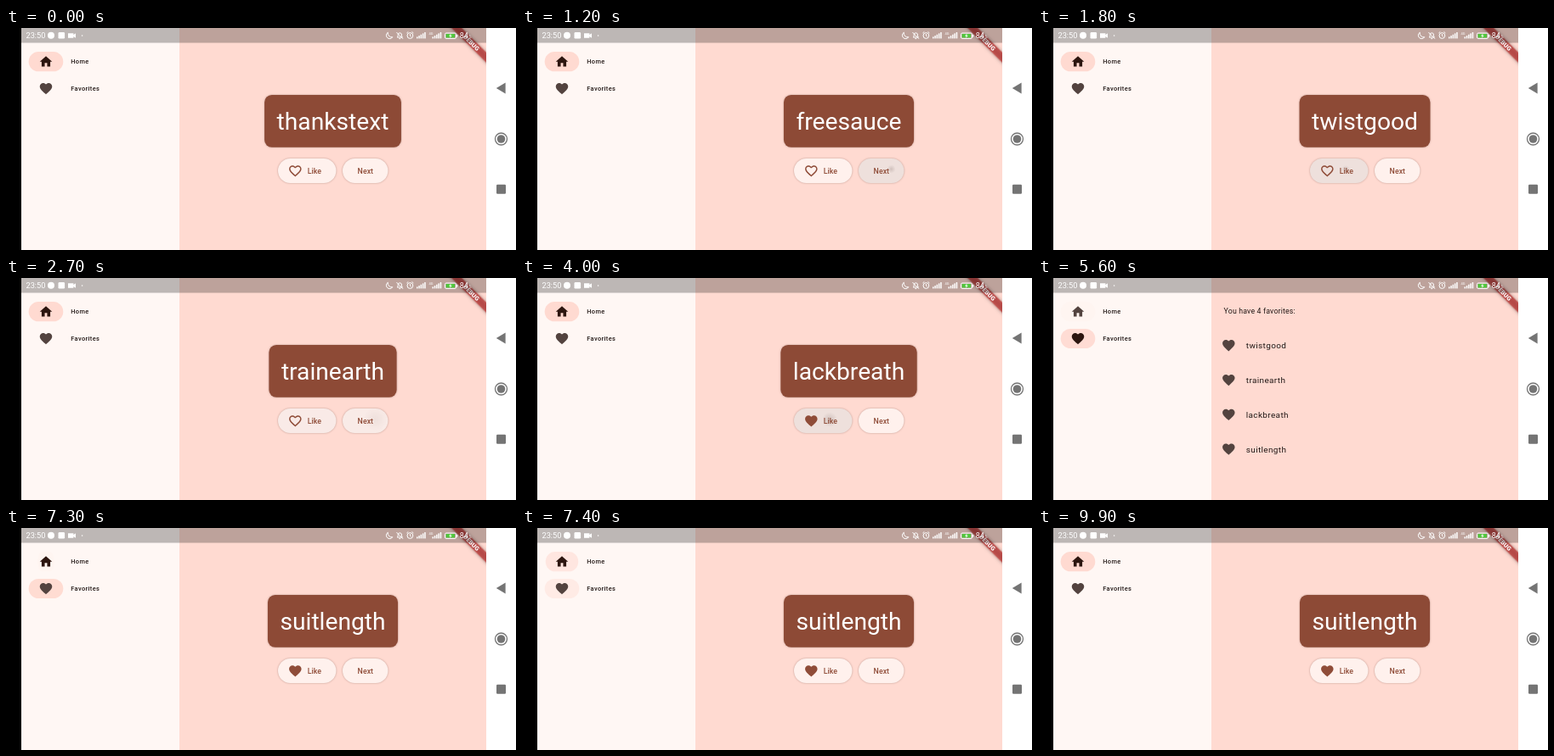
Animation, 600 px wide and 262 px high, one loop 10 s. Source, as an HTML page:

```html
<!DOCTYPE html>
<html lang="en">
<head>
<meta charset="utf-8">
<style>
html, body { margin: 0; width: 100%; height: 100%; overflow: hidden; background: #000; }
svg { display: block; width: 600px; height: 262px; font-family: Roboto, sans-serif; }
.label { font-size: 7.45px; font-weight: 500; letter-spacing: .38px; fill: #231917; }
.button { font-size: 8.75px; font-weight: 500; letter-spacing: .07px; fill: #8f4c38; }
.raised { filter: drop-shadow(0 .8px .8px rgba(60, 25, 15, .32)); }
.count { font-size: 8.73px; letter-spacing: .18px; fill: #231917; }
.item { font-size: 9.98px; letter-spacing: .36px; fill: #231917; }
</style>
</head>
<body>
<svg viewBox="0 0 600 262">
  <defs>
    <path id="heart" d="M12 21.35l-1.45-1.32C5.4 15.36 2 12.28 2 8.5 2 5.42 4.42 3 7.5 3c1.74 0 3.41.81 4.5 2.09C13.09 3.81 14.76 3 16.5 3 19.58 3 22 5.42 22 8.5c0 3.78-3.4 6.86-8.55 11.54L12 21.35z"/>
    <path id="outline" d="M16.5 3c-1.74 0-3.41.81-4.5 2.09C10.91 3.81 9.24 3 7.5 3 4.42 3 2 5.42 2 8.5c0 3.78 3.4 6.86 8.55 11.54L12 21.35l1.45-1.32C18.6 15.36 22 12.28 22 8.5 22 5.42 19.58 3 16.5 3zm-4.4 15.55l-.1.1-.1-.1C7.14 14.24 4 11.39 4 8.5 4 6.5 5.5 5 7.5 5c1.54 0 3.04.99 3.57 2.36h1.87C13.46 5.99 14.96 5 16.5 5c2 0 3.5 1.5 3.5 3.5 0 2.89-3.14 5.74-7.9 10.05z"/>
    <path id="house" d="M10 20v-6h4v6h5v-8h3L12 3 2 12h3v8z"/>
    <radialGradient id="glow">
      <stop offset="0" stop-color="#5c4a45" stop-opacity=".2"/>
      <stop offset="1" stop-color="#5c4a45" stop-opacity="0"/>
    </radialGradient>
    <clipPath id="app"><rect x="18" width="547" height="262"/></clipPath>
  </defs>

  <rect width="600" height="262"/>
  <rect x="204" width="361" height="262" fill="#ffdad1"/>
  <rect x="18" width="186" height="262" fill="#fff7f4"/>

  <g id="rail">
    <rect id="homePill" x="-20.3" y="-11.6" width="40.6" height="23.2" rx="11.6" fill="#ffdad1"/>
    <rect id="favPill" x="-20.3" y="-11.6" width="40.6" height="23.2" rx="11.6" fill="#ffdad1"/>
    <use id="homeIcon" href="#house" transform="translate(38.3 31) scale(.725)"/>
    <use id="favIcon" href="#heart" transform="translate(38.3 62.8) scale(.725)"/>
    <text class="label" x="76.2" y="42.2">Home</text>
    <text class="label" x="76.2" y="74.1">Favorites</text>
  </g>

  <g id="homePage">
    <rect id="card" class="raised" y="79" height="61.8" rx="8.7" fill="#8d4a36"/>
    <text id="word" x="384.5" y="120" font-size="28.2" text-anchor="middle" fill="#fff"></text>
    <rect class="raised" x="320" y="154" width="68.4" height="29" rx="14.5" fill="#fff1ed"/>
    <rect class="raised" x="396" y="154" width="53.4" height="29" rx="14.5" fill="#fff1ed"/>
    <g id="likeInk">
      <rect x="320" y="154" width="68.4" height="29" rx="14.5" fill="#5c4a45" fill-opacity=".1"/>
      <circle id="likeGlow" cx="362" cy="167" fill="url(#glow)"/>
    </g>
    <g id="nextInk">
      <rect x="396" y="154" width="53.4" height="29" rx="14.5" fill="#5c4a45" fill-opacity=".1"/>
      <circle id="nextGlow" cx="434.5" cy="166.5" fill="url(#glow)"/>
    </g>
    <use id="likeIcon" transform="translate(331.6 160) scale(.725)" fill="#8f4c38"/>
    <text class="button" x="354.7" y="171.8">Like</text>
    <text class="button" x="413.6" y="171.8">Next</text>
  </g>

  <g id="favPage">
    <text class="count" x="218.6" y="42.1">You have 4 favorites:</text>
  </g>

  <g clip-path="url(#app)">
    <g transform="translate(547.6 17.4) rotate(45)">
      <rect x="-40" y="-4.35" width="80" height="8.7" fill="#b71c1c" fill-opacity=".63" style="filter:drop-shadow(0 0 2px rgba(0,0,0,.5))"/>
      <text y="2.6" font-size="7.2" font-weight="900" text-anchor="middle" fill="#fff">DEBUG</text>
    </g>
  </g>

  <rect x="18" width="547" height="17.5" fill-opacity=".26"/>
  <g id="status" fill="#fff">
    <text x="23.5" y="12.2" font-size="9.2">23:50</text>
    <circle cx="53" cy="8.8" r="4"/>
    <rect x="61.5" y="5" width="7.6" height="7.6" rx="1.4"/>
    <path d="M73 6.2h6.4v1.8l2.6-1.8v5.6l-2.6-1.8v1.8H73z"/>
    <circle cx="89.6" cy="9" r=".8"/>
    <g fill="none" stroke="#fff" stroke-width="1">
      <path d="M449.3 5.2a4 4 0 1 0 5.5 5.5a4.6 4.6 0 0 1-5.5-5.5z"/>
      <path d="M460.2 11h6.2l-.9-1.3V8a2.2 2.2 0 0 0-4.4 0v1.7zM462.4 12.6h1.8M459.4 5l7.6 7.8"/>
      <circle cx="475.4" cy="9" r="3.4"/>
      <path d="M475.4 7v2.2l1.4.9M471.4 6l1.9-1.6M479.4 6l-1.9-1.6"/>
      <rect x="516.5" y="6" width="13" height="6.4" rx="1.4"/>
    </g>
    <rect x="517.6" y="7" width="10.4" height="4.4" fill="#4fc63c"/>
    <path d="M523.6 6.6l-2.6 3h1.8l-.8 2.4 2.8-3.2H523z"/>
    <rect x="530.2" y="7.8" width="1.2" height="2.8"/>
    <text x="497.6" y="7.6" font-size="4">4G</text>
    <text x="533.8" y="12.2" font-size="9">84</text>
    <text x="544.3" y="12.2" font-size="4.6">%</text>
  </g>

  <rect x="565" width="35" height="262" fill="#fff"/>
  <g fill="#747474">
    <path d="M576.8 71l10.8-6.4v12.8z"/>
    <circle cx="582.5" cy="131" r="7" fill="none" stroke="#747474" stroke-width="1.3"/>
    <circle cx="582.5" cy="131" r="4.8"/>
    <rect x="577" y="184.7" width="11" height="11" rx="1.2"/>
  </g>
</svg>
<script>
const LOOP = 10000, RELEASE = 150;
const OPEN_FAVS = 5420, OPEN_HOME = 7290, SWITCH = 200;
const words = ["thankstext", "freesauce", "twistgood", "trainearth", "lackbreath", "suitlength"];
const nextTaps = [550, 1100, 2200, 3250, 4300];
const likeTaps = [1700, 2670, 3750, 4750];

const $ = id => document.getElementById(id);
const clamp = v => Math.max(0, Math.min(1, v));
const set = (el, attrs) => { for (const k in attrs) el.setAttribute(k, attrs[k]); };

function add(parent, tag, attrs, text = "") {
  const el = document.createElementNS("http://www.w3.org/2000/svg", tag);
  set(el, attrs);
  el.textContent = text;
  parent.append(el);
}

["twistgood", "trainearth", "lackbreath", "suitlength"].forEach((name, i) => {
  const y = 79.6 + i * 40.8;
  add($("favPage"), "use", { href: "#heart", fill: "#53433f", transform: `translate(215.6 ${y - 8.7}) scale(.725)` });
  add($("favPage"), "text", { class: "item", x: 244.8, y: y + 3.5 }, name);
});

for (const x of [483, 501.5])
  for (let i = 0; i < 5; i++) {
    const h = 2 + i * 1.35;
    add($("status"), "rect", { x: x + i * 2.3, y: 12.4 - h, width: 1.5, height: h });
  }

const lastTap = (taps, t) => taps.filter(tap => tap <= t).pop() ?? -LOOP;
const released = (taps, t) => taps.filter(tap => tap + RELEASE <= t).length;

function drawInk(name, taps, t) {
  const age = t - lastTap(taps, t);
  set($(name + "Ink"), { opacity: clamp(age / 90) * clamp((600 - age) / 280) });
  set($(name + "Glow"), { r: 4 + 10 * clamp((age - 60) / 400) });
}

function drawTab(name, selected, p) {
  const scale = selected ? .4 + .6 * (1 - (1 - p) ** 3) : 1;
  const y = name === "home" ? 39.7 : 71.5;
  set($(name + "Pill"), { transform: `translate(47 ${y}) scale(${scale} 1)`, opacity: selected ? p : 1 - p });
  set($(name + "Icon"), { fill: selected ? "#2c150f" : "#53433f" });
}

function draw(t) {
  const onFavs = t >= OPEN_FAVS && t < OPEN_HOME;
  const start = onFavs ? OPEN_FAVS : t < OPEN_FAVS ? -SWITCH : OPEN_HOME;
  const p = clamp((t - start) / SWITCH);
  drawTab("home", !onFavs, p);
  drawTab("fav", onFavs, p);
  $("homePage").style.display = onFavs ? "none" : "";
  $("favPage").style.display = onFavs ? "" : "none";
  if (onFavs) return;

  const index = released(nextTaps, t);
  const word = $("word");
  if (word.textContent !== words[index]) word.textContent = words[index];
  const width = word.getComputedTextLength() + 29;
  set($("card"), { x: 384.5 - width / 2, width });

  // Likes begin with the third word, one per word.
  const liked = index > 1 && released(likeTaps, t) >= index - 1;
  set($("likeIcon"), { href: liked ? "#heart" : "#outline" });
  drawInk("like", likeTaps, t);
  drawInk("next", nextTaps, t);
}

const began = performance.now();
function tick() {
  draw((performance.now() - began) % LOOP);
  requestAnimationFrame(tick);
}
tick();
</script>
</body>
</html>
```
